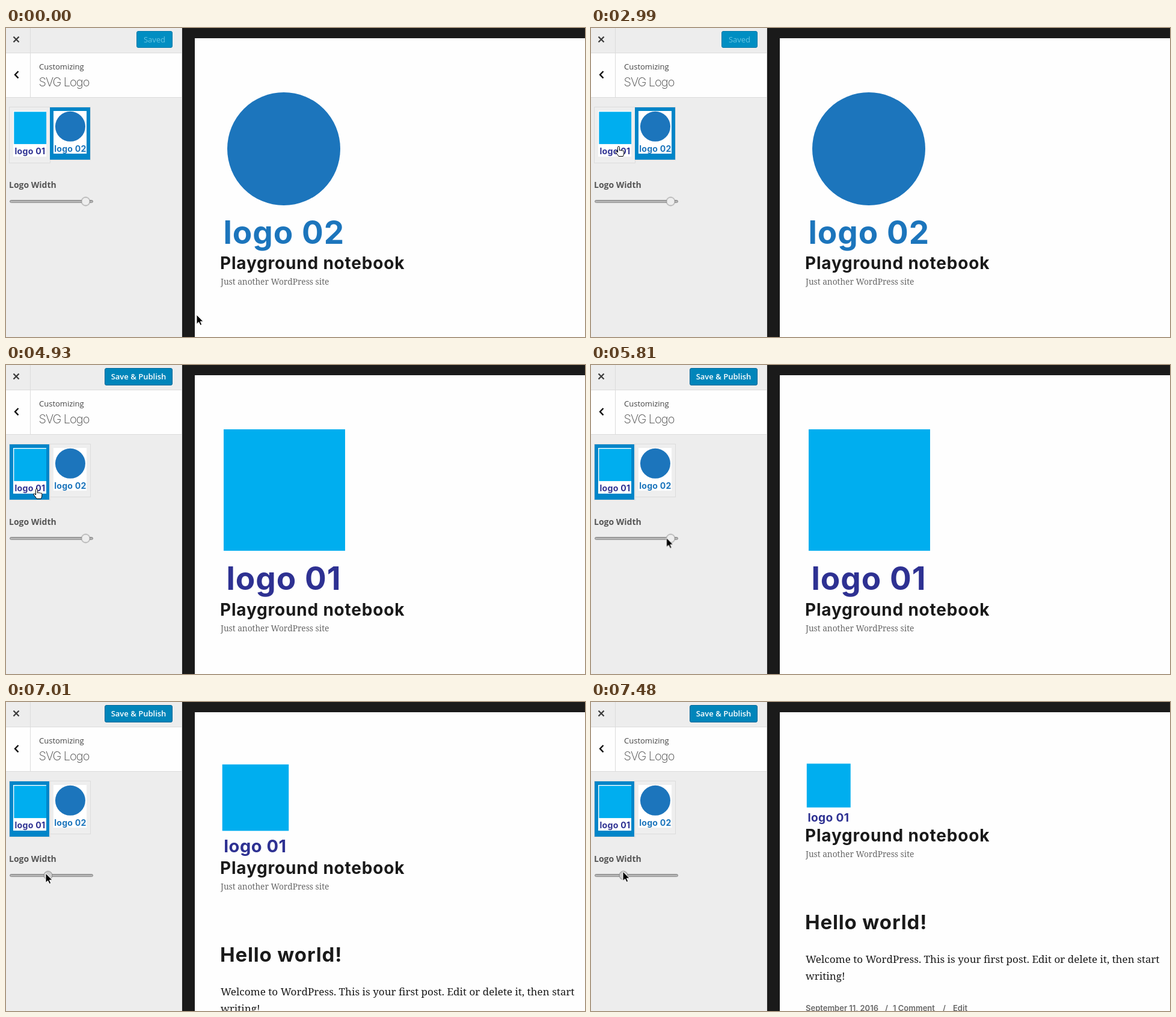
An HTML page for the animation above (8000 ms loop, 963x514 px).

```html
<!DOCTYPE html>
<html lang="en">
<head>
<meta charset="utf-8">
<title>Logo customizer</title>
<style>
  /* --pick: 0 = second logo, 1 = first logo; --size: logo scale; --hand: pointer shape */
  @property --pick { syntax: "<number>"; inherits: true; initial-value: 0; }
  @property --size { syntax: "<number>"; inherits: true; initial-value: 1; }
  @property --hand { syntax: "<number>"; inherits: true; initial-value: 0; }

  html, body { margin: 0; width: 100%; height: 100%; overflow: hidden; background: #1a1a1a; }
  svg { display: block; width: 963px; height: 514px; }

  #stage { animation: pick 8s step-end infinite, size 8s step-end infinite, hand 8s step-end infinite; }
  #cursor { animation: move 8s step-end infinite; }
  #knob { animation: drag 8s step-end infinite; }

  .first { opacity: var(--pick); }
  .second { opacity: calc(1 - var(--pick)); }
  .hand { opacity: var(--hand); }
  .arrow { opacity: calc(1 - var(--hand)); }
  .logo { transform: translate(357px, 100px) scale(var(--size)); }
  .flow { transform: translate(357px, calc(127px + (274px + 16px * var(--pick)) * var(--size))); }

  .ui { font-family: "Open Sans", "Noto Sans", sans-serif; font-size: 13px; }
  .mid { text-anchor: middle; }
  .bold { font-family: Inter, sans-serif; font-weight: 700; }
  .mark { font-size: 53px; letter-spacing: 1px; }
  .site { font-size: 28px; letter-spacing: .8px; }
  .post { font-size: 33px; letter-spacing: .85px; }
  .meta { font: 600 13px Inter, sans-serif; fill: #686868; }
  .serif { font-family: "Noto Serif", serif; }

  @keyframes pick { 0% { --pick: 0; } 48.625%, to { --pick: 1; } }
  @keyframes hand { 0% { --hand: 0; } 26.125% { --hand: 1; } 63.5%, to { --hand: 0; } }
  @keyframes size {
    0% { --size: 1; }
    80.125% { --size: .98; }
    82% { --size: .9; }
    83.875% { --size: .799; }
    85.75% { --size: .672; }
    87.625% { --size: .547; }
    89.5% { --size: .45; }
    91.75% { --size: .385; }
    93.5%, to { --size: .361; }
  }
  @keyframes drag {
    0% { transform: translate(132.5px, 288.5px); fill: #eee; }
    80.125% { transform: translate(127px, 288.5px); fill: #cfcfcf; }
    82% { transform: translate(114px, 288.5px); fill: #cfcfcf; }
    83.875% { transform: translate(98px, 288.5px); fill: #cfcfcf; }
    85.75% { transform: translate(83px, 288.5px); fill: #cfcfcf; }
    87.625% { transform: translate(70px, 288.5px); fill: #cfcfcf; }
    89.5% { transform: translate(61px, 288.5px); fill: #cfcfcf; }
    91.75% { transform: translate(56px, 288.5px); fill: #cfcfcf; }
    93.5%, to { transform: translate(54px, 288.5px); fill: #cfcfcf; }
  }
  @keyframes move {
    0% { transform: translate(317px, 477px); }
    1.75% { transform: translate(300px, 471px); }
    3.625% { transform: translate(271px, 464px); }
    18.625% { transform: translate(202px, 352px); }
    20.5% { transform: translate(151px, 302px); }
    22.375% { transform: translate(112px, 264px); }
    24.25% { transform: translate(83px, 237px); }
    26.125% { transform: translate(65px, 218px); }
    28% { transform: translate(54px, 207px); }
    29.875% { transform: translate(48px, 201px); }
    37.375% { transform: translate(46px, 197px); }
    39.25% { transform: translate(44px, 193px); }
    41.125% { transform: translate(43px, 190.5px); }
    59.75% { transform: translate(44px, 194px); }
    61.625% { transform: translate(51px, 206px); }
    63.5% { transform: translate(63px, 226px); }
    65.375% { transform: translate(78px, 245px); }
    67.25% { transform: translate(94px, 262px); }
    69.125% { transform: translate(109px, 276px); }
    70.875% { transform: translate(120px, 284px); }
    72.625% { transform: translate(125.5px, 287.5px); }
    80.125% { transform: translate(118px, 287.5px); }
    82% { transform: translate(103px, 287.5px); }
    83.875% { transform: translate(87px, 287.5px); }
    85.75% { transform: translate(75px, 287px); }
    87.625% { transform: translate(66px, 285px); }
    89.5% { transform: translate(58px, 283px); }
    91.75% { transform: translate(54px, 282px); }
    93.5%, to { transform: translate(53px, 282px); }
  }
</style>
</head>
<body>
<svg id="stage" viewBox="0 0 963 514" xmlns="http://www.w3.org/2000/svg">
  <defs>
    <g id="one">
      <rect x="5" y="7" width="202" height="202" fill="#00aeef"/>
      <text class="bold mark" x="9.5" y="274" fill="#2e3192">logo 01</text>
    </g>
    <g id="two">
      <circle cx="105" cy="101" r="94" fill="#1c75bc"/>
      <text class="bold mark" x="4.5" y="259" fill="#1c75bc">logo 02</text>
    </g>
    <linearGradient id="groove" x2="0" y2="1">
      <stop stop-color="#9a9a9a"/>
      <stop offset="1" stop-color="#cacaca"/>
    </linearGradient>
  </defs>

  <!-- page preview -->
  <rect width="963" height="514" fill="#1a1a1a"/>
  <rect x="314" y="17" width="649" height="497" fill="#fefefe"/>
  <g class="logo">
    <use class="first" href="#one"/>
    <use class="second" href="#two"/>
  </g>
  <g class="flow" fill="#1a1a1a">
    <text class="bold site" x="-1">Playground notebook</text>
    <text class="serif" y="26" font-size="13.7" font-weight="500" fill="#686868">Just another WordPress site</text>
    <text class="bold post" x="-1" y="146.5">Hello world!</text>
    <g class="serif" font-size="17.1">
      <text y="202">Welcome to WordPress. This is your first post. Edit or delete it, then start</text>
      <text y="230">writing!</text>
    </g>
    <g class="meta">
      <text y="282">September 11, 2016</text>
      <text x="132" y="282">/</text>
      <text x="145" y="282">1 Comment</text>
      <text x="228" y="282">/</text>
      <text x="245" y="282">Edit</text>
    </g>
  </g>

  <!-- sidebar -->
  <rect width="293" height="514" fill="#ededed"/>
  <rect y="42" width="292" height="73" fill="#fefefe"/>
  <path d="M0 41.5H292M0 115.5H292M40.5 0V115M292.5 0V514" stroke="#dcdcdc"/>
  <path d="M12.5 14.5l9 9m0-9l-9 9" stroke="#3c3c3c" stroke-width="2.3"/>
  <path d="M20.5 72l-5.5 5.7 5.5 5.7" fill="none" stroke="#111" stroke-width="2.4"/>

  <g class="ui">
    <g class="second">
      <rect x="217.5" y="5.5" width="59" height="27" rx="2.5" fill="#008ec2" stroke="#0479a8"/>
      <text class="mid" x="247" y="24" fill="#66c6e4">Saved</text>
    </g>
    <g class="first">
      <rect x="164.5" y="5.5" width="112" height="28" rx="2.5" fill="#0085ba" stroke="#006799"/>
      <text class="mid" x="220.5" y="24" fill="#fff" font-weight="600">Save &amp; Publish</text>
    </g>
    <text x="55" y="69" fill="#444" font-weight="500">Customizing</text>
    <text x="5" y="266" font-size="14" font-weight="700" fill="#555">Logo Width</text>
  </g>
  <text x="54.5" y="97" font-family="Inter, sans-serif" font-size="20" font-weight="200" letter-spacing="-1" fill="#444">SVG Logo</text>

  <!-- logo choices -->
  <g fill="#eee" stroke="#dcdcdc">
    <rect x="5.5" y="131.5" width="68" height="93"/>
    <rect x="73.5" y="131.5" width="67" height="88"/>
  </g>
  <rect class="first" x="6" y="132" width="66" height="92" fill="#0085c8"/>
  <rect class="second" x="73" y="132" width="67" height="87" fill="#0085c8"/>
  <path d="M12 138h55v76H12zM79 138h55v71H79z" fill="#fff"/>
  <use href="#one" transform="translate(12 137.5) scale(.266)"/>
  <use href="#two" transform="translate(79 137) scale(.266)"/>

  <!-- width slider -->
  <rect x="6.5" y="286.5" width="138" height="4" rx="2" fill="url(#groove)" stroke="#8c8c8c"/>
  <circle id="knob" r="7" stroke="#858585"/>

  <g id="cursor" stroke-linejoin="round">
    <path class="arrow" d="M0 0V15.5L3.6 12.2L6.2 17.5L8.7 16.4L6.3 11.2H11Z" fill="#000" stroke="#fff"/>
    <path class="hand" d="M-1.5 10V1.5a1.5 1.5 0 0 1 3 0V7q1-1.6 2.5 0q1.3-1.3 2.4.3q2-1 2.4 1V12q-.4 2.4-1.6 4.5H0Q-2 13-5 9.8q-.6-2 1.3-1.8Z" fill="#fff" stroke="#000"/>
  </g>
</svg>
</body>
</html>
```
